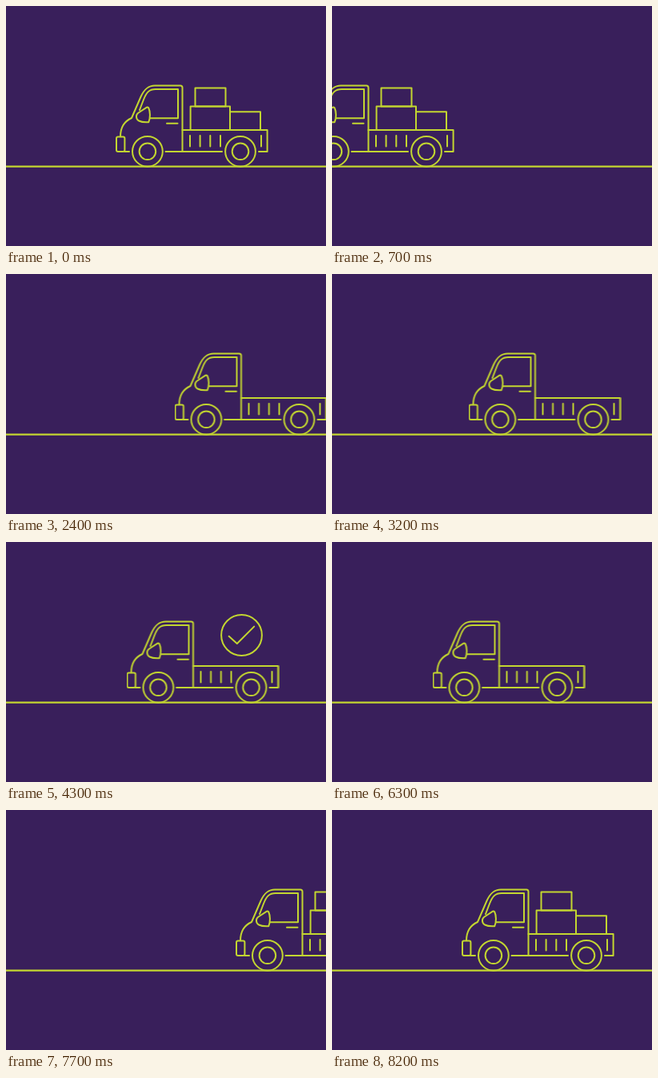
Write an HTML page that moves like this. It is 400 by 300 pixels and loops after 8300 ms.

```html
<!DOCTYPE html>
<html lang="en">
<head>
<meta charset="utf-8">
<title>Delivery truck</title>
<style>
  html, body { margin: 0; width: 100%; height: 100%; overflow: hidden; background: #391f5b; }
  svg { display: block; width: 400px; height: 300px; }
  .line { fill: none; stroke: #c3d630; stroke-width: 2; stroke-linecap: round; stroke-linejoin: round; }

  /* 8.3 s loop at ten poses per second; the small lead keeps pose changes off exact ticks */
  .loaded, .empty, .tick { animation: 8300ms -4ms infinite step-end; }
  .loaded { animation-name: deliver; }
  .empty { animation-name: comeBack; }
  .tick { animation-name: confirm; }

  @keyframes deliver {
    0% { transform: translateX(0); animation-timing-function: steps(14); }
    16.8675% { transform: translateX(-350px); }
    86.747% { transform: translateX(275px); animation-timing-function: steps(11); }
    100% { transform: translateX(0); }
  }
  /* fast entry, slow roll to a stop, pause, fast exit */
  @keyframes comeBack {
    0% { transform: translateX(263.5px); }
    12.0482% { transform: translateX(263.5px); animation-timing-function: steps(6); }
    19.2771% { transform: translateX(113.5px); animation-timing-function: steps(20); }
    43.3735% { transform: translateX(13.5px); }
    74.6988% { transform: translateX(13.5px); animation-timing-function: steps(15); }
    92.7711%, 100% { transform: translateX(-361.5px); }
  }
  @keyframes confirm {
    0% { opacity: 0; }
    45.7831% { opacity: 0; animation-timing-function: steps(5); }
    51.8072% { opacity: 1; }
    75.9036%, 100% { opacity: 0; }
  }
</style>
</head>
<body>
<svg viewBox="0 0 400 300">
  <defs>
    <g id="wheel">
      <circle r="18.9"/>
      <circle r="10.3"/>
    </g>
    <g id="truck">
      <!-- cab -->
      <rect x="138" y="163.5" width="10.4" height="18.4" rx="2"/>
      <path d="M143 163.3C143 152 148 144 157 140L168.5 113.5C173 103.5 178 99.4 186 99.4H218Q220.5 99.4 220.5 102V182"/>
      <path d="M167 130L172 117C175.5 108 179 104 187 104H215V140.2H180"/>
      <path d="M176 126.7L165.5 133.5C162 136 162 141 166 143.5C169 145 174 145.5 178.3 145.2C180.5 140 180.5 132 178.2 127.3Q177.2 126 176 126.7Z"/>
      <path d="M201 146.8H214.5"/>
      <!-- bed and sills -->
      <path d="M220.5 155H326.6V182H316M199.5 182H270M148.4 182H154"/>
      <path d="M230 162V175.5M242.6 162V175.5M255.3 162V175.5M268 162V175.5M319 162V175.5"/>
      <use href="#wheel" x="176.9" y="181.8"/>
      <use href="#wheel" x="293" y="181.8"/>
    </g>
  </defs>
  <rect width="400" height="300" fill="#391f5b"/>
  <g class="line">
    <g class="loaded">
      <use href="#truck"/>
      <rect x="236.5" y="102.6" width="38" height="22.8"/>
      <rect x="230.6" y="125.4" width="49.4" height="29.6"/>
      <rect x="280" y="132.2" width="38" height="22.8"/>
    </g>
    <g class="empty"><use href="#truck"/></g>
    <g class="tick">
      <circle cx="294.5" cy="116.5" r="25.4"/>
      <path d="M278.6 117.8L288.8 127L310.2 105.6"/>
    </g>
    <path d="M-2 200.7H402" stroke-width="2.2"/>
  </g>
</svg>
</body>
</html>
```
